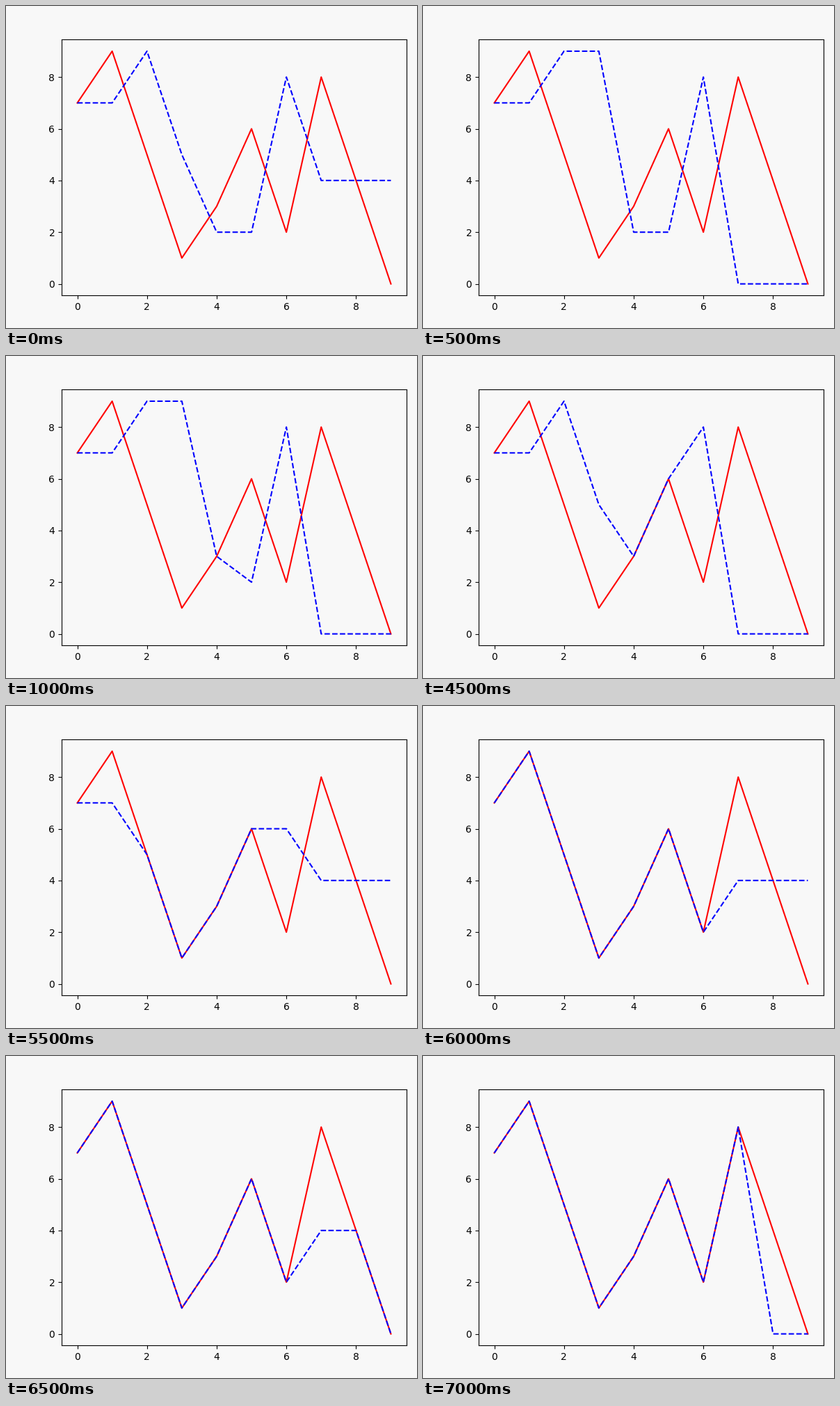
Recreate the animation shown at these times as a matplotlib script. Size 591 by 463 pixels, loop 8000 ms.

```python
import matplotlib.pyplot as plt
from matplotlib.animation import FuncAnimation

W, H, DPI = 591, 463, 100
STEP = 500  # ms
BG = "#f8f8f8"
LEFT, RIGHT, TOP, BOTTOM = 80, 576, 48.25, 416.3  # axes edges in pixels

GOAL = [7, 9, 5, 1, 3, 6, 2, 8, 4, 0]

# (guess, steps it stays on screen)
GUESSES = [
    ("7795228444", 1),
    ("7799228000", 1),
    ("7799328000", 7),
    ("7795368000", 1),
    ("7795366444", 1),
    ("7751366444", 1),
    ("7951362444", 1),
    ("7951362440", 1),
    ("7951362800", 2),
]
SCHEDULE = [[int(c) for c in digits] for digits, stay in GUESSES for _ in range(stay)]

fig = plt.figure(figsize=(W / DPI, H / DPI), dpi=DPI, facecolor=BG)
ax = fig.add_axes(
    [LEFT / W, 1 - BOTTOM / H, (RIGHT - LEFT) / W, (BOTTOM - TOP) / H],
    facecolor=BG,
)
ax.set(xlim=(-0.45, 9.45), ylim=(-0.45, 9.45),
       xticks=range(0, 10, 2), yticks=range(0, 10, 2))

ax.plot(GOAL, "r-", lw=1.5)
guess_line, = ax.plot(SCHEDULE[0], "b--", lw=1.5)


def update(i):
    guess_line.set_ydata(SCHEDULE[i])
    return guess_line,


anim = FuncAnimation(fig, update, frames=len(SCHEDULE), interval=STEP,
                     repeat=True, repeat_delay=0, blit=False)
plt.show()
```
